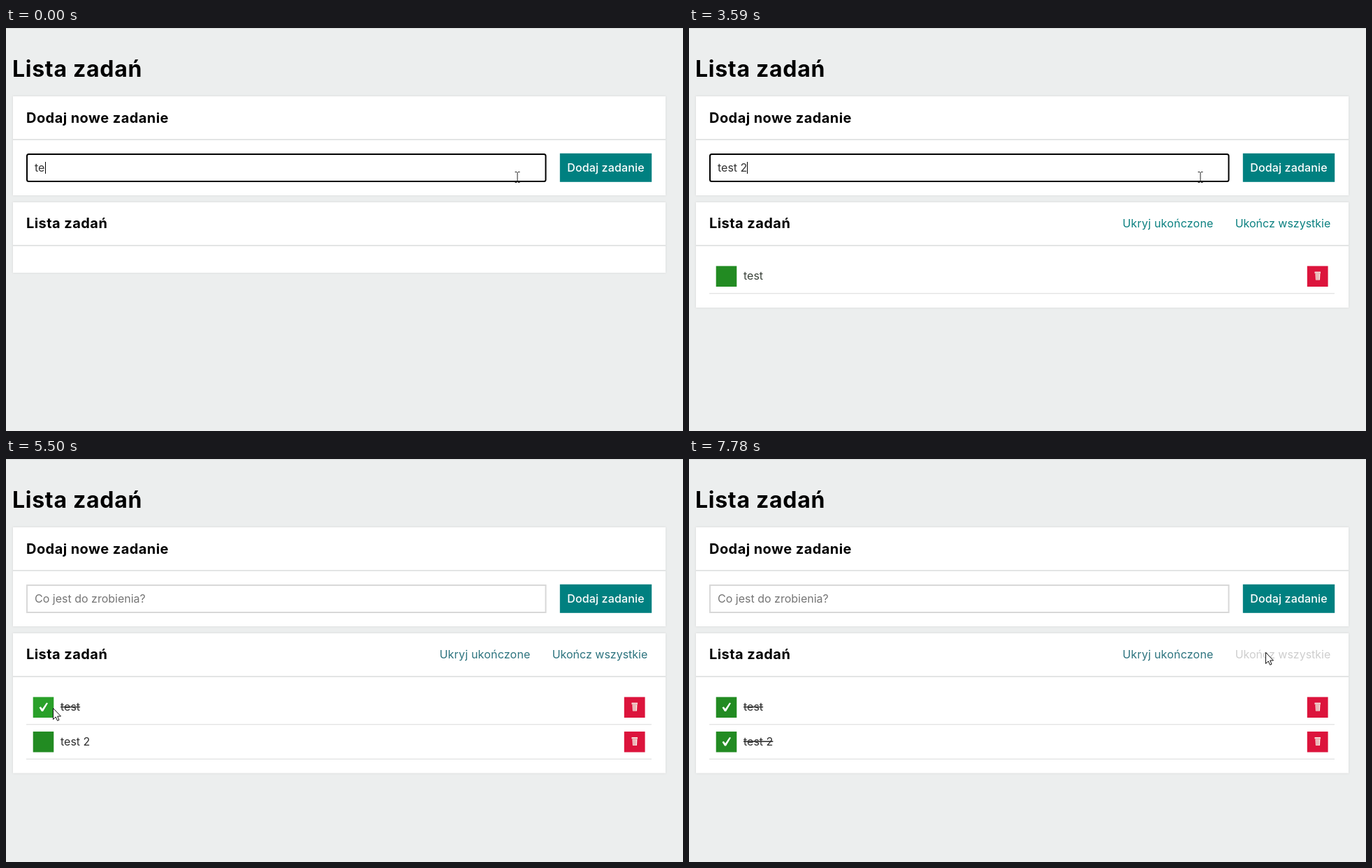
Animation, 969 px wide and 578 px high, one loop 8 s. Source, as an HTML page:

```html
<!DOCTYPE html>
<html lang="pl">
<head>
<meta charset="utf-8">
<title>Lista zadań</title>
<style>
  html, body { margin: 0; width: 100%; height: 100%; overflow: hidden; background: #eceeee; }
  svg { display: block; width: 100%; height: 100%; }
  text { font: 400 16px Inter, "Open Sans", sans-serif; white-space: pre; }
  .title, .heading { font-weight: 700; letter-spacing: .022em; }
  .title { font-size: 32px; }
  .heading { font-size: 20px; }
  .button { font-weight: 500; letter-spacing: .01em; }
  .card { fill: #fff; filter: drop-shadow(0 0 1.5px #d4d6d6); }
  .rule { fill: #e3e5e5; }
  .done text { text-decoration: line-through; }
  .done .check { visibility: visible; }
  .check { visibility: hidden; fill: #fff; }
</style>
</head>
<body>
<svg viewBox="0 0 969 578">
  <defs>
    <g id="trash">
      <rect x="884.8" y="341.4" width="29.8" height="29.6" fill="#dc143c"/>
      <path d="M895.5 349.500h8.500v2.500h-.5l-.5 9.500h-6l-.5-9.500h-1z" fill="#f5dcd8"/>
      <path d="M896 352h7.500M898.500 353v8M900.500 353v8" stroke="#d4707a" stroke-width=".7"/>
    </g>
  </defs>
  <rect width="969" height="578" fill="#eceeee"/>
  <rect width="969" height="1" fill="#d9dbdb"/>
  <text class="title" x="9" y="69.5">Lista zadań</text>

  <rect class="card" x="10" y="98" width="934" height="142"/>
  <text class="heading" x="29" y="135.5">Dodaj nowe zadanie</text>
  <rect class="rule" x="10" y="159" width="934" height="2"/>
  <rect id="field" x="30" y="181" width="742.5" height="39" fill="#fff" stroke-width="2"/>
  <text id="entry" x="41" y="205.5"></text>
  <rect id="caret" y="192" width="1" height="17"/>
  <rect x="792.8" y="179.8" width="131.400" height="41" fill="#008080"/>
  <text class="button" x="858.5" y="205.5" text-anchor="middle" fill="#fff">Dodaj zadanie</text>

  <rect id="list" class="card" x="10" y="250" width="934"/>
  <text class="heading" x="29" y="287">Lista zadań</text>
  <rect class="rule" x="10" y="311" width="934" height="2"/>
  <g id="links">
    <text x="685.5" y="285.5" text-anchor="middle" letter-spacing=".2">Ukryj ukończone</text>
    <text id="finishAll" x="850" y="285.5" text-anchor="middle">Ukończ wszystkie</text>
  </g>
  <g id="rows"></g>

  <path id="beam" d="M728.5 206.500h2.500l1 1 1-1h2.500M732 207.500v13M728.500 221.500h2.500l1-1 1 1h2.500" fill="none" stroke="#222"/>
  <path id="arrow" d="M.5.5V16.500L4.200 13 6.600 18.300 9 17.200 6.700 12H11.500Z" fill="#fff" stroke="#111"/>
</svg>
<script>
const LOOP = 8000;
const $ = id => document.getElementById(id);
const clamp = v => Math.min(1, Math.max(0, v));
const ramp = (t, start, end) => clamp((t - start) / (end - start));
const mix = (a, b, p) => a + (b - a) * p;
const mixColor = (from, to, p) => `rgb(${from.map((v, i) => mix(v, to[i], p))})`;
const within = (t, start, end) => t >= start && t < end;

const GREEN = [34, 139, 34], BRIGHT_GREEN = [41, 160, 41];
const TEAL = [11, 128, 128], MUTED_TEAL = [44, 115, 126], GREY = [206, 206, 206];

// [time, typed text, caret x (0 = hidden)]
const typing = [
  [0, 'te', 56], [200, 'tes', 63], [330, 'test', 70], [860, 'test', 0],
  [930, '', 0], [1390, '', 41], [1920, '', 0],
  [2390, 't', 47], [2740, 'te', 56], [2930, 'tes', 63], [3140, 'test', 70],
  [3390, 'test ', 74], [3590, 'test 2', 83],
  [3790, '', 41], [4320, '', 0], [4850, '', 41], [5150, '', 0]
];

// [first step, last step, number of steps, end x, end y]
const moves = [
  [4120, 4390, 5, 111, 365],
  [4590, 5010, 7, 67, 357],
  [6360, 6360, 1, 84, 357],
  [6426, 6820, 7, 781, 298],
  [7080, 7220, 3, 815, 265],
  [7290, 7430, 3, 825, 277]
];

function pointerAt(t) {
  let [x, y] = [732, 214];
  for (const [start, end, steps, endX, endY] of moves) {
    if (t < start) break;
    const interval = (end - start) / (steps - 1) || 1;
    const p = clamp((Math.floor((t - start) / interval + 1e-6) + 1) / steps);
    const eased = p * p * (3 - 2 * p);
    [x, y] = [mix(x, endX, eased), mix(y, endY, eased)];
  }
  return [Math.round(x), Math.round(y)];
}

const rows = ['test', 'test 2'].map((label, i) => {
  $('rows').insertAdjacentHTML('beforeend', `
    <g transform="translate(0 ${i * 49.5})">
      <rect class="box" x="38.7" y="341.4" width="29.600" height="29.600" fill="rgb(${GREEN})"/>
      <path class="check" d="M47.500 356.500l2.200-1.200 2.300 3 6-8.800 2 .8-7 11.700h-2z"/>
      <text x="78" y="361">${label}</text>
      <use href="#trash"/>
      <rect x="29" y="380.3" width="895" height="1" fill="#d9dbdb"/>
    </g>`);
  return $('rows').lastElementChild;
});
const firstBox = rows[0].querySelector('.box');

function draw(t) {
  const [, text, caretX] = typing.findLast(([time]) => t >= time);
  const entry = $('entry'), field = $('field');
  entry.textContent = text || 'Co jest do zrobienia?';
  entry.setAttribute('fill', text ? '#333' : '#757575');
  $('caret').setAttribute('x', caretX);
  $('caret').style.visibility = caretX ? 'visible' : 'hidden';

  const focused = t < 5150;
  field.setAttribute('stroke', focused ? '#000' : '#d8d8d8');
  field.setAttribute('rx', focused ? 2.5 : 0);

  const count = (t >= 930) + (t >= 3790);
  const linkColor = focused ? TEAL : MUTED_TEAL;
  $('list').setAttribute('height', [101, 151, 200.5][count]);
  $('links').style.display = count ? '' : 'none';
  $('links').setAttribute('fill', `rgb(${linkColor})`);
  $('finishAll').setAttribute('fill', mixColor(linkColor, GREY, ramp(t, 7500, 7780)));

  rows.forEach((row, i) => {
    const done = t >= 7500 || (i === 0 && within(t, 5290, 5780));
    row.style.display = i < count ? '' : 'none';
    row.setAttribute('class', done ? 'done' : '');
    row.querySelector('text').setAttribute('fill', focused ? '#3c443c' : '#303030');
  });

  const hover = ramp(t, 4870, 5170) - ramp(t, 6360, 6660);
  firstBox.setAttribute('fill', mixColor(GREEN, BRIGHT_GREEN, hover));

  const [x, y] = pointerAt(t), overField = t < 4120;
  $('beam').style.display = overField ? '' : 'none';
  $('arrow').style.display = overField ? 'none' : '';
  $('arrow').setAttribute('transform', `translate(${x} ${y})`);
}

const origin = performance.now();
function tick() {
  draw((performance.now() - origin) % LOOP);
  requestAnimationFrame(tick);
}
tick();
</script>
</body>
</html>
```
